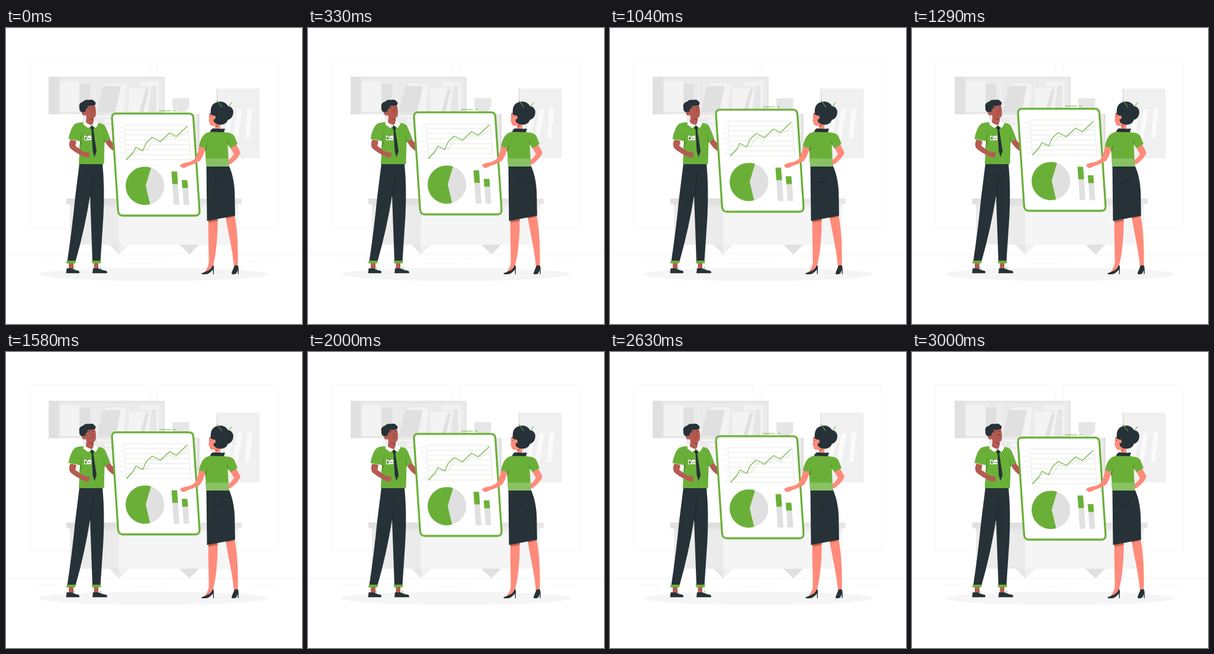
Recreate the animation shown at these times as an HTML page without scripts. Size 500 by 500 pixels, loop 3040 ms.

```html
<!DOCTYPE html>
<html lang="en">
<head>
<meta charset="utf-8">
<title>Presentation board</title>
<style>
html, body { margin: 0; width: 100%; height: 100%; overflow: hidden; background: #fff; }
svg { display: block; width: 100%; height: 100%; }
.green { fill: #6ab038; }
.dark { fill: #263238; }
.brown { fill: #b55b52; }
.pink { fill: #ff8b7b; }
.line { fill: none; stroke-linecap: round; stroke-linejoin: round; }
.board { animation: lift 3040ms linear -20ms infinite; }
@keyframes lift { 50% { transform: translateY(-9.5px); } }
</style>
</head>
<body>
<svg viewBox="0 0 500 500" xmlns="http://www.w3.org/2000/svg">
  <!-- room -->
  <g fill="none" stroke="#f5f5f5">
    <rect x="39.500" y="55.500" width="203" height="282" rx="3"/>
    <rect x="255.500" y="55.500" width="203" height="282" rx="3"/>
    <path stroke="#ebebeb" stroke-width=".6" d="M0 382.500H500"/>
    <path d="M53 393.500h33M198 397.500h53M259 390.500h15M412 394.500h44"/>
  </g>
  <ellipse cx="250" cy="416" rx="194" ry="11.300" fill="#f5f5f5"/>

  <!-- shelves -->
  <path fill="#ebebeb" d="M130 145H327V205H318V190H130Z"/>
  <path fill="#f5f5f5" d="M154 148h25v3h-25zM166 153.500h14v7h-14zM166 163h14v24h-14z"/>
  <path fill="#e0e0e0" d="M323.500 145H327V205H323.500Z"/>
  <path fill="#e6e6e6" d="M72 82.500H268V145.500H72Z"/>
  <path fill="#ebebeb" d="M91 86H148V142H91ZM151 86H205V142H151ZM209 86H265V142H209Z"/>
  <path fill="#e0e0e0" d="M72 82.500H88.500V145.500H72ZM124 94H142V142H124ZM164 98H195L184 142H153ZM222 104H241L233 142H218Z"/>
  <path fill="#f3f3f3" d="M91 90.500H124V142H91ZM170 94H203L199 142H185L194 98H169ZM208 101H237L225 142H208ZM226 90.500H258V142H232L243 98H226Z"/>
  <path fill="#e6e6e6" d="M246 97H254V142H240Z"/>
  <path fill="#f0f0f0" d="M148 86h2.500v58h-2.500zM205.500 86h2.500v58h-2.500z"/>
  <path fill="#e6e6e6" d="M281 118.500H309.500V131Q308 139 301 142H290Q282 139 281 131Z"/>

  <!-- wall picture -->
  <path fill="#f0f0f0" d="M356 102.500H428.500V220H356Z"/>
  <path fill="#e0e0e0" d="M355.500 102.500h2v117.500h-2z"/>
  <path fill="#fafafa" d="M376 137H384L376 186H368ZM391 137H399L391 186H383ZM408 136H416L411 186H404Z"/>

  <!-- desk -->
  <path fill="#ebebeb" d="M108 298H191V366H108Z"/>
  <path fill="#f5f5f5" d="M191 298H392V366H191Z"/>
  <path fill="#e6e6e6" d="M102 288H398V297.500H102ZM108 297.500H191V302H108Z"/>
  <path fill="#ebebeb" d="M191 297.500H392V301.500H191Z"/>
  <path fill="#e0e0e0" d="M102 288H190V297.500H102ZM293 366H326L310 382.500Z"/>
  <path fill="#e6e6e6" d="M175 366H191V382.500Z"/>
  <path fill="#f0f0f0" d="M191 366H208L191 382.500Z"/>

  <!-- man -->
  <g>
    <path class="brown" d="M166 189L174 185Q177 192 184 196V208.500Q173 204 166 189Z"/>
    <path class="brown" d="M106 397H114V407H106ZM148.500 397H156V407H148.500Z"/>
    <path class="dark" d="M102.500 406H111Q116 409 122.500 410Q125 412 123.500 414.300H101.500ZM147 406H156Q162 409 169 410Q172 412 170.500 414.300H146Z"/>
    <path class="line" stroke="#6ab038" stroke-width=".7" d="M112 406.500l3-3 1 4M157 406.500l3-3 1 4"/>
    <path class="dark" d="M124 229H163Q167 270 164.500 318L159.500 394H146L142 283Q133 340 117.500 394H103.500Q111 345 117 285Z"/>
    <path class="line" stroke="#17212a" stroke-width=".8" d="M147 247Q146 268 142 285"/>
    <path class="green" d="M103 393H118L117 397.500H101.500ZM145 393H160.500L160 397.500H145.500Z"/>

    <path class="green" d="M117 161.500Q126 158.500 132 159.500L146 167L157 160.500Q166 161.500 168 167Q173 178 176 187L166.500 193.500L165.500 230H123L125 191L105.500 187.500Q109 168 117 161.500Z"/>
    <path class="line" stroke="#4b8426" stroke-width=".8" d="M125 192L128 178M166.500 193L165 181"/>
    <path fill="#4b8426" d="M123.500 207L126 190L128 193Z"/>
    <path class="brown" d="M108.500 188.500L118.500 190.500Q119 195 117 199L131 209Q136 209.500 141.500 211L140 218.500Q134 219.500 129 216Q116 210 108.500 203Q105 198 108.500 188.500Z"/>
    <path fill="#fff" d="M132 156L130.500 163L139 169L145 164L151.500 169L156 162L150 157Z"/>
    <path class="brown" d="M135 145H148V157Q148 161 145 164Q136 162 134.500 158Q137 153 135 145Z"/>
    <path fill="#914942" d="M139 151Q143 154 148 153V156Q143 156 139 151Z"/>
    <path class="dark" d="M145 164L149 169L147.500 172L153 208L149.500 218L146.500 208L144.500 172L142.500 169Z"/>
    <path class="brown" d="M134.500 132Q142 125 150 130Q153 140 151.500 148Q149 154 144 153Q136 151 134 146Z"/>
    <path class="dark" d="M131.500 147Q129 144 127.500 142Q123 139 124 134Q122 127 130 124.500Q134 120 140 121.500Q147 120 149 123.500Q153 126 150.500 130Q144 132 138 131.500Q138 136 134.500 138V143Z"/>
    <circle class="brown" cx="132" cy="144.500" r="3.300"/>
    <path class="line" stroke="#263238" stroke-width=".8" d="M138.500 135.200l2.800-1M146.500 134l2.500 .8M142 138.500v.5M148.500 138.500v.5"/>
    <path class="line" stroke="#82382f" stroke-width=".7" d="M145.500 137.500l1.500 4-2 .5M142.500 145.500q2 1.500 4.500 .5"/>
    <path fill="#fff" d="M132 182H144V189.500H132Z"/>
    <path class="green" d="M133 183.500h3.500v4.500h-3.500z"/>
    <path class="line" stroke="#263238" stroke-width=".8" d="M137.500 181v3M133.500 187.500h3M138.500 186.500h4"/>
  </g>

  <!-- board -->
  <g class="board">
    <path class="line" stroke="#6ab038" stroke-width="1.200" stroke-linecap="butt" style="stroke-linecap:butt" d="M258.500 140H278.500M282 140H287"/>
    <path fill="#fff" stroke="#6ab038" stroke-width="3.300" d="M186 144.700H309Q316 144.700 316.500 152L327 309Q327.400 317 320 317H197.500Q190 317 189.400 309L179 152Q178.600 144.700 186 144.700Z"/>
    <path fill="none" stroke="#e0e4da" stroke-width=".8" d="M199 163.800H308M199.600 172.200h109M200.200 180.600h109M200.700 189h109M201.300 197.400h109M201.900 205.800h109M202.500 214.200h109M203 222.600h109M199 163.800l4 58.800M308 163.800l4 58.800"/>
    <path fill="none" stroke="#e6e6e6" stroke-width=".8" d="M189 167.700h8M189.600 176.300h8M190.200 184.900h8M190.800 193.500h8M191.400 202.100h8M192 210.700h8M192.600 219.300h8"/>
    <path class="line" stroke="#d5d5d5" stroke-width=".9" d="M204 222.500L217 211L222 206L238 206.500L247 191L260 194L277 183L287 187L307 174.500"/>
    <path class="line" stroke="#6ab038" stroke-width="1.200" d="M203.500 222.500L215 210L219.500 201.500L231 207.500L237 194L247 184.800L260.500 191.800L276.500 177.200L287.500 183.500L306 166.300"/>

    <path fill="#e0e0e0" d="M245 236.200A32 32 0 0 1 243.500 297.600L236 266.500Z"/>
    <path class="green" d="M245 236.200L236 266.500L243.500 297.700A32.300 32.300 0 1 1 245 236.200Z"/>

    <path fill="#e0e0e0" d="M281 263.500H290.500L293 298.700H283.400ZM298 270H307.500L309.500 298.700H300Z"/>
    <path class="green" d="M279.500 242.500H289L290.500 263.800H281ZM296.800 257H306.300L307.500 270.200H297.900Z"/>
  </g>

  <!-- woman -->
  <g>
    <path class="pink" d="M342 322H357.500C358 350 355 385 349 404L339 412L336 411.500Q341 405 342.500 398C343 375 341 350 342 322ZM370.500 316H386C391 340 392.500 375 391.500 404H385C383 375 375 345 370.500 316Z"/>
    <path fill="#c9604f" d="M342 325L357.500 322V326L342 329ZM371 319L386 316V318.500L372 322Z"/>
    <path class="dark" d="M330 414.500Q338 411 341 410Q347 407 349.500 400.500L351 402V416H349.800L349.500 408Q344 415 338 416H331ZM386 401.500Q389 400 392 401.500Q393.500 407 392.800 416H391.700L391.500 408Q390 415.500 386 416H382Q380.500 415 381.500 412.500Z"/>
    <path class="dark" d="M338.500 233L376.500 232.500Q387 255 386.500 290L387 317L339.500 326Z"/>
    <path class="line" stroke="#151f25" stroke-width=".8" d="M352 262Q362 260 369 253"/>
    <path class="pink" d="M327 198L337 200Q335 215 327.500 224.500Q318 230 307 233.500Q303 236.500 298 236.500L293.500 232Q298 228 304 227.500Q314 226 320 220Q324 210 327 198Z"/>
    <path class="pink" d="M378 201L388 196Q394 205 396 211Q392 220 383 227Q380 231 373 230.500L373.500 223.500Q380 222 385 212.500Z"/>
    <path class="green" d="M342 176Q356 173 372 176.500Q383 177 386 183L391 196L379.500 203L374.500 197L376.500 234H338.500L336 202L326 200.500Q329 180 342 176Z"/>
    <path fill="#8ac163" d="M337 220.500H376L376.500 234H338Z"/>
    <path fill="#4b8426" d="M336 205L341 196L337 210ZM374.500 197L373 189L376 195Z"/>
    <path class="pink" d="M343.500 144Q342.500 150 343 153Q341.500 157 343.500 159Q344 167 353.500 165V172H362V150L354 140Z"/>
    <path fill="#c9604f" d="M353.500 165Q357 164 359 161Q358 167 353.500 168.500Z"/>
    <path class="dark" d="M344.500 175.500Q347 170 350 169.500Q360 170.500 370 170L368 176Z"/>
    <path class="dark" d="M346 146Q344 128 357 125Q369 122 375 132Q384 133 384 143Q383 153 375 155Q372 163 363 163.500Q354 163 351 158L350 148Z"/>
    <ellipse class="pink" cx="351.300" cy="151" rx="2.700" ry="3.300"/>
    <path class="line" stroke="#263238" stroke-width=".8" d="M343.500 145.500l2-1M345.300 149v.7"/>
    <path class="line" stroke="#6ab038" stroke-width="1.100" d="M356.500 122.500L364.500 133.500M376.500 132L381 126"/>
  </g>
</svg>
</body>
</html>
```
